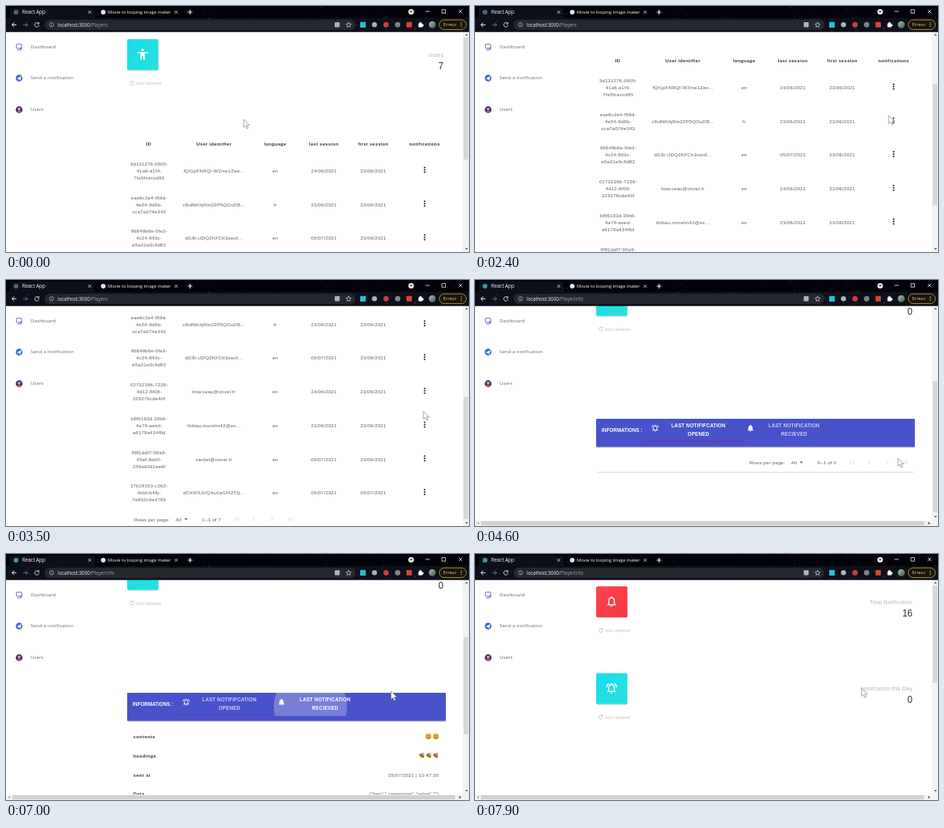
These frames come from a looping animation (600x319 px, 8000 ms). An HTML page:

```html
<!DOCTYPE html>
<html lang="en">
<head>
<meta charset="utf-8">
<style>
html, body { margin: 0; width: 100%; height: 100%; overflow: hidden; background: #fff; }
svg { display: block; width: 600px; height: 319px; font-family: "Liberation Sans", Arial, sans-serif; }
.ui { font-family: "Open Sans", "Noto Sans", sans-serif; }
</style>
</head>
<body>
<svg id="stage" viewBox="0 0 600 319"></svg>
<script>
const LOOP = 8000, STEP = 100, TOP = 33.5;

// --- drawing helpers ---
const text = (x, y, s, o = {}) => {
  const { size = 6.1, fill = '#585858', at = 'middle', bold, gap = .3, cls = '' } = o;
  const base = y + size * .36 + (cls ? 0 : .7);
  return `<text x="${x}" y="${base}" font-size="${size}" fill="${fill}" text-anchor="${at}"
    letter-spacing="${gap}" class="${cls}" ${bold ? 'font-weight="700"' : ''}>${s}</text>`;
};
const rect = (x, y, w, h, fill, r = 0, extra = '') =>
  `<rect x="${x}" y="${y}" width="${w}" height="${h}" fill="${fill}" rx="${r}" ${extra}/>`;
const disc = (x, y, r, fill, extra = '') => `<circle cx="${x}" cy="${y}" r="${r}" fill="${fill}" ${extra}/>`;
const line = (d, color, w = 1) => `<path d="${d}" fill="none" stroke="${color}" stroke-width="${w}"/>`;
const shape = (d, fill) => `<path d="${d}" fill="${fill}"/>`;
// places a 24-unit icon with its centre at x, y
const icon = (x, y, size, body) =>
  `<g transform="translate(${x - size / 2} ${y - size / 2}) scale(${size / 24})">${body}</g>`;
const cross = (x, y, r, color) =>
  line(`M${x - r} ${y - r}l${2 * r} ${2 * r}M${x + r} ${y - r}l${-2 * r} ${2 * r}`, color, .8);

const bellBody = 'M12 22a2 2 0 0 0 2-2h-4a2 2 0 0 0 2 2zM18 16v-5c0-3-1.6-5.6-4.5-6.3V4a1.5 1.5 0 0 0-3 0v.7C7.6 5.4 6 8 6 11v5l-2 2v1h16v-1z';
const bell = shape(bellBody, '#fff');
const hollowBell = `<path fill-rule="evenodd" fill="#fff" d="${bellBody}M16 17H8v-6c0-2.5 1.5-4.5 4-4.5s4 2 4 4.5z"/>`;
const ringing = hollowBell + line('M7 3.4Q3 6 3 10.5M17 3.4Q21 6 21 10.5', '#fff', 2);
const reload = color => line('M18.5 7.5A8 8 0 1 0 20 13.5M19.5 3v6h-6', color, 2.2);
const person = disc(12, 4, 2.4, '#fff') + shape('M2 8h20v2.4h-6V22h-2.6v-6h-2.8v6H8V10.4H2z', '#fff');
const star = line('M12 3l2.7 6.3 6.8.6-5.2 4.5 1.6 6.7L12 17.5l-5.9 3.6 1.6-6.7L2.5 9.9l6.8-.6z', '#dfe2e7', 2);

const card = (y, fill, glyph) =>
  rect(158, y + 1.5, 39, 40, '#0002', 1.5) + rect(157, y, 40.5, 40, fill, 1.5) + icon(177, y + 19.5, 17, glyph);
const stat = (y, label, value, fill, glyph) => card(y, fill, glyph) +
  text(567, y + 19.5, label, { size: 7, fill: '#b4b4b4', at: 'end', gap: .25 }) +
  text(567, y + 33.5, value, { size: 12, fill: '#333', at: 'end', gap: 0 }) +
  icon(163, y + 57, 7.5, reload('#b5b5b5')) +
  text(168, y + 56.5, 'Just Updated', { size: 5.4, fill: '#bdbdbd', at: 'start', gap: .12 });

const pager = (x, y, range) => {
  const chevron = (cx, dir) => line(`M${cx - dir} ${y - 2.4}l${2 * dir} 2.4l${-2 * dir} 2.4`, '#cfcfcf', .8);
  const bar = cx => line(`M${cx} ${y - 2.6}v5.2`, '#cfcfcf', .8);
  return text(x, y, 'Rows per page:', { at: 'start', gap: .25 }) + text(x + 54, y, 'All', { at: 'start' }) +
    shape(`M${x + 65} ${y - 1}h4.4l-2.2 2.4z`, '#666') + text(x + 88, y, range, { at: 'start', gap: .2 }) +
    bar(x + 131) + chevron(x + 135, -1) + chevron(x + 155, -1) + chevron(x + 178.5, 1) +
    chevron(x + 200.5, 1) + bar(x + 204);
};

// --- users page ---
const columns = [[185, 'ID'], [269.5, 'User identifier'], [349, 'language'], [412, 'last session'],
  [476, 'first session'], [542.5, 'notifications']];
const players = [
  ['3d131276-0905- 41a6-a1f4- 7fa5fceccd95', 'fQf1pFNRQl-W2me1Zee...', 'en', '24/06/2021', '23/06/2021'],
  ['eae6c2e4-f59d- 4e04-9d0b- cca7a074e343', 'c9idNKhjRm22P5QOuDB...', 'fr', '23/06/2021', '23/06/2021'],
  ['96849b6e-0fe3- 4c24-893c- e5a31e0c9d82', 'dG8l-iJDQ2KFCh3swxf...', 'en', '05/07/2021', '23/06/2021'],
  ['02732396-7238- 4d12-8f08- 229276cde40f', 'lmarceau@otivel.fr', 'en', '24/06/2021', '23/06/2021'],
  ['b8f6193d-39b6- 4a79-aeed- a6179a434f6d', 'thibau.morelin42@ex...', 'en', '23/06/2021', '23/06/2021'],
  ['9f81ddf7-90a9- 45ef-8dd0- 259ad2d1eedf', 'vardel@otivel.fr', 'en', '05/07/2021', '23/06/2021'],
  ['37b18153-c262- 4bbf-b4fb- 7e832c9e4785', 'dOX6f3JVQ4uXeGf43TQ...', 'en', '05/07/2021', '05/07/2021']
];
const playerRow = ([id, ...cells], i) => {
  const y = 213 + i * 43.75;
  return id.split(' ').map((part, k) => text(185.5, y + (k - 1) * 9, part)).join('') +
    cells.map((s, k) => text(columns[k + 1][0], y, s)).join('') +
    [-3, 0, 3].map(d => disc(542.5, y - .5 + d, 1.05, '#111')).join('');
};
const usersPage = stat(43, 'Users', '7', 'url(#teal)', person) +
  columns.map(([x, s]) => text(x, 178, s, { bold: 1, size: 5.9, gap: .38, fill: '#333' })).join('') +
  players.map(playerRow).join('') + pager(166, 510, '1--1 of 7');

// --- player info page ---
const tab = (id, x, lines) => `<g id="${id}">` +
  lines.map((s, k) => text(x, 335.5 + k * 11, s, { bold: 1, size: 6.4, fill: '#fff', gap: .17 })).join('') + '</g>';
const smiley = x => disc(x, 384.5, 3.9, '#e9b93a') + disc(x - 1.4, 383.5, .6, '#4a3510') +
  disc(x + 1.4, 383.5, .6, '#4a3510') + line(`M${x - 2} 385.6q2 2.2 4 0`, '#4a3510', .8);
const bee = x => `<g transform="rotate(40 ${x} 409)">` + disc(x, 406.6, 1.8, '#b9c4cc') +
  `<ellipse cx="${x}" cy="409.5" rx="3.8" ry="2.1" fill="#d9a92c"/>` +
  line(`M${x - 1.5} 407.7v3.6M${x + .5} 407.5v4M${x + 2.5} 408v3`, '#2b2412', .9) + '</g>';
const detail = (y, label, value) => text(165, y, label, { at: 'start', bold: 1, size: 5.9, gap: .5, fill: '#333' }) +
  text(561, y, value, { at: 'end' });
const infoPage = stat(42, 'Total Notification', '16', 'url(#red)', hollowBell) +
  stat(154.5, 'Notification this Day', '0', 'url(#teal)', ringing) +
  rect(157.5, 330, 412, 36, '#0002', 1) + rect(157, 328, 413, 36.5, '#4852ca', 1) +
  '<circle id="ripple" cx="394.5" cy="346" fill="#fff" clip-path="url(#tabBox)"/>' +
  text(164, 341.5, 'INFORMATIONS :', { at: 'start', bold: 1, size: 6.4, fill: '#fff', gap: 0 }) +
  icon(233.5, 340, 11, ringing) + icon(357, 340, 11, bell) +
  tab('opened', 289.5, ['LAST NOTIFIFCATION', 'OPENED']) +
  tab('received', 413.5, ['LAST NOTIFICATION', 'RECIEVED']) +
  rect(222, 356.7, 125, 1.1, '#84298f', 0, 'id="marker"') +
  `<g id="empty">${pager(355.7, 384.5, '0--1 of 0')}${line('M159 397.3H568', '#c9c9c9', .8)}</g>` +
  `<g id="details">${detail(384.5, 'contents', '')}${smiley(547.5)}${smiley(557)}` +
  detail(409.5, 'headings', '') + [539, 548, 557].map(bee).join('') +
  detail(434, 'sent at', '05/07/2021 | 10:47:35') +
  detail(458.5, 'Data', '{"key":" campagne","value":""}') + '</g>';

// --- fixed parts ---
const sidebar = rect(0, TOP, 150, 286, '#fff') +
  [[52.5, 'Dashboard'], [93, 'Send a notification'], [134, 'Users']].map(([y, s]) =>
    text(32, y, s, { size: 6.1, fill: '#566070', at: 'start', cls: 'ui', gap: .15 })).join('') +
  rect(13.4, 49.4, 7, 5.6, '#f4f3ff', .8, 'stroke="#7066a8" stroke-width=".9"') +
  line('M14.5 57h5', '#7066a8', .9) + disc(19.5, 55, 1.5, '#5b86e5') +
  disc(17, 93.5, 4.4, '#3f6fd0') + shape('M14 94l6-3-1.6 5.4-1.8-1.5z', '#fff') +
  disc(17, 134.5, 4.4, '#34357a') + disc(17, 133.5, 1.8, '#e0a58c') + shape('M14 137.6q3-4 6 0-3 2.4-6 0z', '#c9575e');

let seed = 7;
const random = () => (seed = seed * 16807 % 2147483647) / 2147483647;
const stars = Array.from({ length: 150 }, () =>
  disc(random() * 600, random() * TOP, .3 + random() * .3, '#6f7ba6', `opacity="${.2 + random() * .5}"`)).join('');

const label = (x, y, s, size, fill) => text(x, y, s, { size, fill, at: 'start', cls: 'ui', gap: 0 });
const browser = rect(0, 0, 600, TOP, '#020308') + rect(0, 15.5, 600, TOP - 15.5, '#0d101a') + stars +
  shape('M2 16q3 0 3-4V5q0-3 3-3h104q3 0 3 3v7q0 4 3 4z', '#0d101a') +
  disc(13, 8, 3.1, '#45667f', 'id="favicon"') +
  label(21, 8, 'React App', 6.4, '#fff') + cross(108.5, 8, 1.9, '#eee') +
  disc(126, 8, 3, '#e3e7ec') +
  label(132, 8, 'Movie to looping image maker', 5.8, '#fff') +
  cross(220.5, 8, 1.9, '#eee') + line('M235.5 8h6M238.5 5v6', '#fff', 1) +
  disc(525, 7.5, 3.6, '#eee') + shape('M523.3 6.6h3.4l-1.7 2.2z', '#111') +
  line('M543.5 7h5.5', '#eee', .8) + rect(565, 4.7, 4.5, 4.5, 'none', 0, 'stroke="#eee" stroke-width=".8"') +
  cross(589, 7, 2.3, '#eee') +
  line('M13.5 24.3H8M10.5 21.5L7.7 24.3l2.8 2.8', '#fff', 1) +
  line('M22.3 24.3H28M25.3 21.5l2.8 2.8-2.8 2.8', '#7c808a', .9) +
  icon(40, 24.3, 8.5, reload('#fff')) +
  rect(50, 17.7, 403, 13.2, '#25272e', 6.6) +
  disc(59, 24.3, 2.7, 'none', 'stroke="#b5b8be" stroke-width=".7"') + line('M59 23.8v2.1M59 22.4v.7', '#b5b8be', .7) +
  '<text x="67" y="26.6" font-size="6.2" class="ui" fill="#f6f7f8">localhost:3000<tspan id="path" fill="#a2a6ad"></tspan></text>' +
  rect(426, 21, 6.4, 6.4, '#aeb4bd', .8) + icon(444, 24.2, 8.5, star) +
  rect(459, 20.7, 7.2, 7.2, '#23c3d2', .5) + disc(477.5, 24.3, 3.3, '#a9b3bd') +
  disc(492.5, 24.3, 3.5, '#d23b3b') + disc(507.5, 24.3, 3.5, '#7d848c') + rect(519, 20.7, 7, 7, '#d8452f', .8) +
  rect(534.5, 22.3, 5.2, 5.2, '#fff', .6) + disc(537, 22, 1.3, '#fff') + disc(540, 25, 1.3, '#fff') +
  disc(552.5, 24.3, 4.5, 'url(#avatar)') +
  rect(561.5, 18, 35, 12.6, '#17150f', 6.3, 'stroke="#c79a35" stroke-width=".9"') +
  label(566.5, 24.2, 'Erreur', 5.9, '#f3cf7c') +
  [-2.3, 0, 2.3].map(d => disc(590, 24.3 + d, .7, '#f3cf7c')).join('');

const scrollbars = rect(592, TOP, 8, 286, '#f3f3f3') + shape('M595 38.3h3.6l-1.8-2.2z', '#555') +
  rect(593, 41, 6, 0, '#d8d8d8', 0, 'id="thumb"') + `<g id="down">${shape('M595 0h3.6l-1.8 2.2z', '#555')}</g>` +
  `<g id="across">${rect(0, 312, 600, 7, '#f3f3f3')}${rect(8, 312.8, 574, 5.4, '#d0d0d0')}` +
  shape('M5 313.6v3.6l-2.2-1.8z', '#999') + shape('M587.5 313.6v3.6l2.2-1.8z', '#333') + '</g>';

const gradient = (id, a, b) => `<linearGradient id="${id}" x2="1" y2="1"><stop stop-color="${a}"/><stop offset="1" stop-color="${b}"/></linearGradient>`;
document.getElementById('stage').innerHTML =
  `<defs>${gradient('teal', '#14dfea', '#2be0dc')}${gradient('red', '#ff4350', '#f5363f')}${gradient('avatar', '#a9c6b4', '#3c5347')}
   <clipPath id="tabBox"><rect x="347" y="328" width="125" height="30"/></clipPath></defs>` +
  rect(0, 0, 600, 319, '#fff') + `<g id="users">${usersPage}</g><g id="info">${infoPage}</g>` +
  sidebar + scrollbars + browser +
  '<path id="cursor" d="M0 0v10.5l2.5-2.3 1.7 3.9 1.7-.8-1.7-3.7h3.3z" fill="#fff" stroke="#808080" stroke-width=".7"/>';

// --- motion: [time, values...] joined by straight lines ---
const pointer = [[0, 308, 147], [450, 405, 210], [900, 498, 176], [1200, 536, 142], [3200, 536, 142], [3500, 541, 170],
  [3600, 541, 174], [4100, 541, 231], [4400, 541, 231], [4600, 548, 231], [4800, 548, 231], [5300, 445, 204], [6200, 394, 196],
  [6400, 394, 196], [7000, 499, 178], [7200, 501, 174]];
const scrolling = [[1900, 0], [2400, 108], [2600, 125], [2700, 125], [3300, 200], [4499, 200], [4500, 148],
  [7100, 148], [7800, 0]];
function sample(keys, t) {
  const i = keys.findIndex(k => k[0] > t);
  if (i < 0) return keys[keys.length - 1].slice(1);
  if (!i) return keys[0].slice(1);
  const a = keys[i - 1], b = keys[i], p = (t - a[0]) / (b[0] - a[0]);
  return a.slice(1).map((v, k) => v + (b[k + 1] - v) * p);
}

const $ = id => document.getElementById(id);
const set = (id, attrs) => Object.entries(attrs).forEach(([k, v]) => $(id).setAttribute(k, v));
const show = (id, on) => set(id, { display: on ? 'inline' : 'none' });

function draw(now) {
  const t = Math.floor(now % LOOP / STEP) * STEP;
  const info = t >= 4500, loaded = t >= 6500;
  const [scroll] = sample(scrolling, t), [x, y] = sample(pointer, t);
  show('users', !info);
  show('info', info);
  show('across', info);
  show('empty', !loaded);
  show('details', loaded);
  set(info ? 'info' : 'users', { transform: `translate(0 ${-scroll})` });
  set('cursor', { transform: `translate(${x} ${y})` });
  set('favicon', { fill: info ? '#3a9aa5' : '#45667f' });
  $('path').textContent = info ? '/PlayerInfo' : '/Players';

  const track = info ? 262 : 272, view = info ? 280 : 286;
  const page = !info ? 492 : loaded ? 582 : 431;
  set('thumb', { y: 41 + scroll * track / page, height: track * view / page });
  set('down', { transform: `translate(0 ${info ? 306 : 314})` });

  const grow = Math.min(1, Math.max(0, (t - 6300) / 500));
  set('ripple', { r: 47.5 * grow, opacity: t < 7200 ? .25 : 0 });
  set('opened', { opacity: loaded ? .7 : 1 });
  set('received', { opacity: loaded ? 1 : .7 });
  set('marker', { opacity: loaded ? .6 : 1 });
}

const start = performance.now();
(function tick() {
  draw(performance.now() - start);
  requestAnimationFrame(tick);
})();
</script>
</body>
</html>
```
